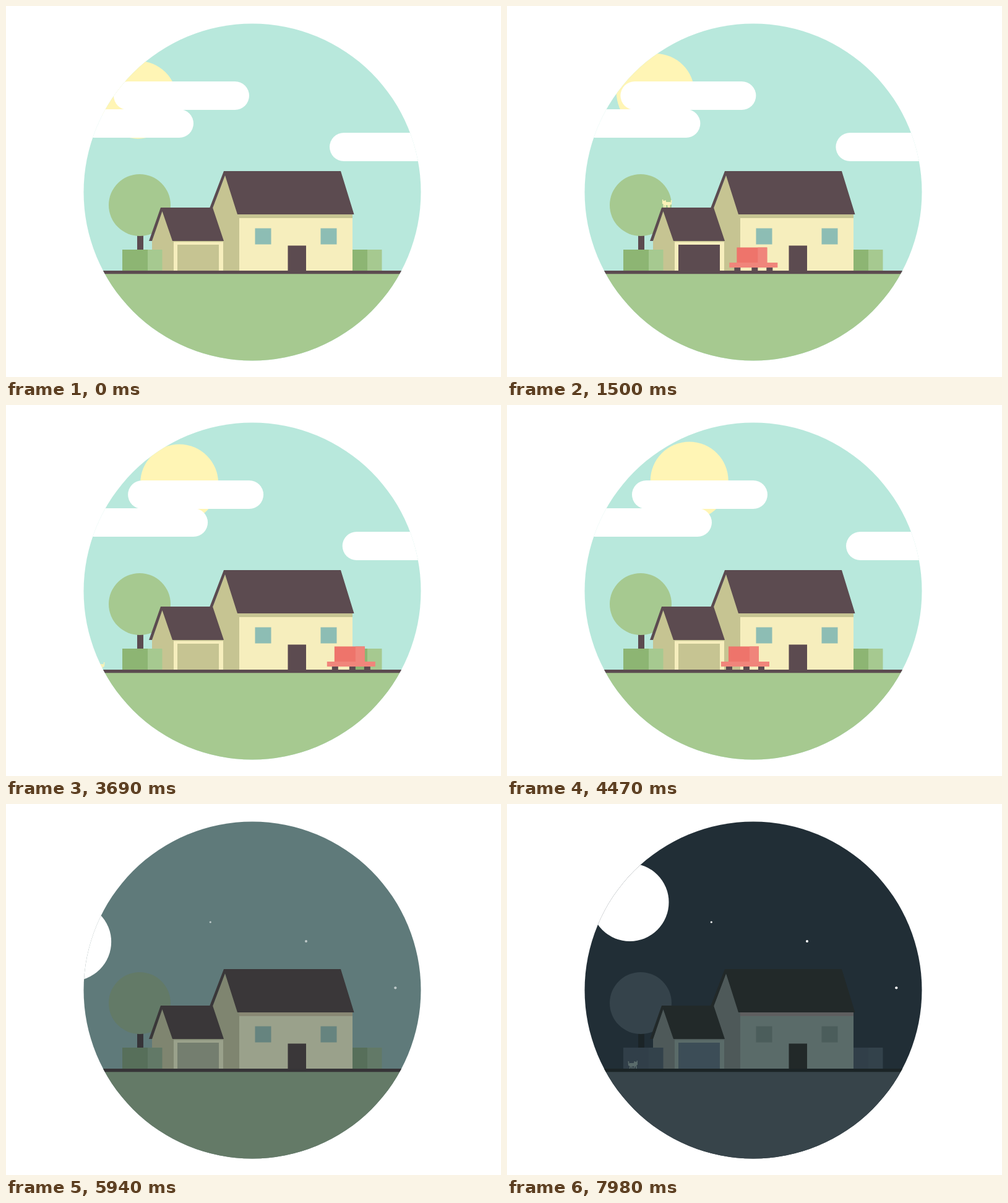
Animation, 800 px wide and 600 px high, one loop 8 s. Source, as an HTML page with a canvas:

```html
<!DOCTYPE html>
<html lang="en">
<head>
<meta charset="utf-8">
<title>House, day to night</title>
<style>
html, body { margin: 0; width: 100%; height: 100%; overflow: hidden; background: #fff; }
canvas { display: block; width: 800px; height: 600px; }
</style>
</head>
<body>
<canvas id="stage" width="800" height="600"></canvas>
<script>
const ctx = document.getElementById('stage').getContext('2d');
const LOOP = 8000;

// [day, night]
const PALETTE = {
  sky: ['b8e8dc', '212e36'],
  ground: ['a6c990', '37444a'],
  line: ['5c4b50', '1b2426'],
  tree: ['a6c990', '35434b'],
  trunk: ['5c4b50', '1b2427'],
  bushDark: ['8db573', '313f49'],
  bushLight: ['a6c990', '33424b'],
  roof: ['5c4b50', '222929'],
  wall: ['f6eebd', '5a6b69'],
  side: ['c6c492', '4e5959'],
  eave: ['c6c492', '5f5f60'],
  shutter: ['c6c492', '3c4d57'],
  window: ['8dbdb4', '4b5d5b'],
  cat: ['faf2b8', '5a6b6b'],
  car: ['ee746b', '6a4a4c'],
  carLight: ['f0857b', '70504f']
};

const clamp = v => Math.max(0, Math.min(1, v));
const span = (t, a, b) => clamp((t - a) / (b - a));
const smooth = p => p * p * (3 - 2 * p);
const cubic = p => p < .5 ? 4 * p ** 3 : 1 - 4 * (1 - p) ** 3;
const mix = (a, b, p) => a + (b - a) * p;

let night = 0;
function color(name) {
  const [a, b] = PALETTE[name].map(h => parseInt(h, 16));
  const part = s => Math.round(mix(a >> s & 255, b >> s & 255, night));
  return `rgb(${part(16)},${part(8)},${part(0)})`;
}
const paint = c => { ctx.fillStyle = PALETTE[c] ? color(c) : c; };

function box(c, x1, y1, x2, y2) {
  paint(c);
  ctx.fillRect(x1, y1, x2 - x1, y2 - y1);
}
function disc(c, x, y, r) {
  paint(c);
  ctx.beginPath();
  ctx.arc(x, y, r, 0, Math.PI * 2);
  ctx.fill();
}
function poly(c, ...p) {
  paint(c);
  ctx.beginPath();
  for (let i = 0; i < p.length; i += 2) ctx.lineTo(p[i], p[i + 1]);
  ctx.closePath();
  ctx.fill();
}
function cloud(x1, x2, y) {
  paint('#fff');
  ctx.beginPath();
  ctx.roundRect(x1, y, x2 - x1, 46, 23);
  ctx.fill();
}

// Sun and moon share one arc; the angle is in degrees from the top.
function orb(c, deg) {
  const a = deg * Math.PI / 180;
  disc(c, 398 + 431 * Math.sin(a), 541 - 431 * Math.cos(a), 63);
}

function drawSky(t) {
  const s = t / 1000;
  const sweep = cubic(span(t, 5000, 6200));
  box('sky', 0, 0, 800, 600);
  if (night > 0) {
    ctx.globalAlpha = night;
    disc('#fff', 330.3, 191, 1.6);
    disc('#fff', 485, 222, 2);
    disc('#fff', 629.3, 297.3, 2.1);
    ctx.globalAlpha = 1;
  }
  orb('#fff5b5', -25.4 + 2.58 * s + 96.3 * sweep);
  if (t > 5600) {
    const rest = 1 - span(t, 5700, 6600);
    orb('#fff', -30.7 + 2.48 * (s - 6.72) - 25 * rest ** 3);
  }
  const left = 6.26 * s - 310 * sweep;
  cloud(174 + left, 393 + left, 122);
  cloud(-100 + left, 303 + left, 167);
  cloud(523 + 5.6 * s + 166 * sweep, 1000, 205);
}

function drawCat(x, y, dir, walking, t) {
  ctx.save();
  ctx.translate(x, y);
  ctx.scale(dir, 1);
  box('cat', -7.5, -11, -1.5, -6);
  box('cat', -7.5, -13, -6, -11);
  box('cat', -3.5, -12, -2, -11);
  box('cat', -6, -9, 5.5, -4);
  const step = walking ? Math.sin(t / 60) : 1;
  [-5, -2.5, 2, 4].forEach((leg, i) => {
    const dx = i % 2 ? step : -step;
    poly('cat', leg - 1, -4, leg + 1, -4, leg + 1 + dx, 0, leg - .5 + dx, 0);
  });
  poly('cat', 4, -8, 6, -8, 6.5, -12, 8, -12, 7.5, -5, 4, -4);
  ctx.restore();
}

function drawGroundCat(t) {
  if (t >= 1660 && t < 2060) {
    const p = span(t, 1660, 2060);
    drawCat(mix(249, 218, p), 326 - 22 * p + 124 * p * p, -(-1), false, t);
  } else if (t >= 2060 && t < 4000) {
    drawCat(187 + .0408 * (2820 - t), 428, 1, true, t);
  } else if (t > 6900) {
    drawCat(203.5 - .05 * (7980 - t), 428, -1, true, t);
  }
}

function drawTree() {
  box('trunk', 212, 365, 222, 428);
  disc('tree', 216, 322, 50);
}

function drawBush(x1, x2, x3) {
  box('bushDark', x1, 394, x2, 428);
  box('bushLight', x2, 394, x3, 428);
}

function drawHouse() {
  poly('side', 354, 274, 377, 337, 377, 428, 345, 428, 334, 327);
  box('wall', 377, 337, 560, 428);
  box('eave', 377, 336, 560, 343);
  poly('roof', 352, 267, 541, 267, 562.5, 337, 374, 337, 354, 274, 334, 327, 329, 327);
  for (const x of [402.5, 508.5]) box('window', x, 359.5, x + 26, 385.5);
  box('roof', 455.5, 387.5, 485, 428);
}

function carLeft(t) {
  if (t < 3000) return 251 + 300 * Math.max(0, t / 1000 - .9) ** 2;
  if (t < 4800) return 346 + 300 * Math.max(0, 4.45 - t / 1000) ** 2;
  return mix(346, 251, smooth(span(t, 4800, 5330)));
}

function drawCar(x) {
  ctx.save();
  ctx.beginPath();
  ctx.rect(277, 380, 523, 60);
  ctx.clip();
  box('car', x + 12, 390.5, x + 61, 415);
  box('carLight', x + 46, 390.5, x + 61, 415);
  box('carLight', x, 415, x + 78, 423);
  for (const wheel of [8, 36, 60]) box('line', x + wheel, 423, x + wheel + 10, 430);
  ctx.restore();
}

function drawGarage(t) {
  poly('side', 252.5, 332, 271, 380, 271, 428, 236, 428, 236, 380);
  box('wall', 271, 380, 351, 428);
  box('side', 271, 379, 351, 381.5);
  poly('roof', 250, 326, 334, 326, 352, 380, 269, 380, 252.5, 332, 236, 380, 231, 380);
  box('roof', 277, 386, 344, 428);
  drawBush(188, 229, 252.5);

  const open = t < 3000
    ? span(t, 300, 800) - span(t, 1700, 2200)
    : span(t, 4490, 4850) - span(t, 5360, 5780);
  const shutter = () => box('shutter', 277, 386, 344, 428 - 42 * open);
  const x = carLeft(t);
  // A car parked inside stays behind the shutter.
  if (x < 300) { drawCar(x); shutter(); }
  else { shutter(); drawCar(x); }
}

function draw(t) {
  night = smooth(span(t, 5380, 6380));
  ctx.clearRect(0, 0, 800, 600);
  ctx.save();
  ctx.beginPath();
  ctx.arc(398, 301, 272.5, 0, Math.PI * 2);
  ctx.clip();

  drawSky(t);
  drawTree();
  drawBush(558, 584, 607.5);
  if (t < 1660) drawCat(258.5 + .0575 * (1500 - t), 326, 1, true, t);
  drawHouse();
  drawGarage(t);
  drawGroundCat(t);
  box('ground', 0, 433, 800, 600);
  box('line', 0, 428, 800, 433.3);
  ctx.restore();
}

const start = performance.now();
function tick() {
  draw((performance.now() - start) % LOOP);
  requestAnimationFrame(tick);
}
tick();
</script>
</body>
</html>
```
